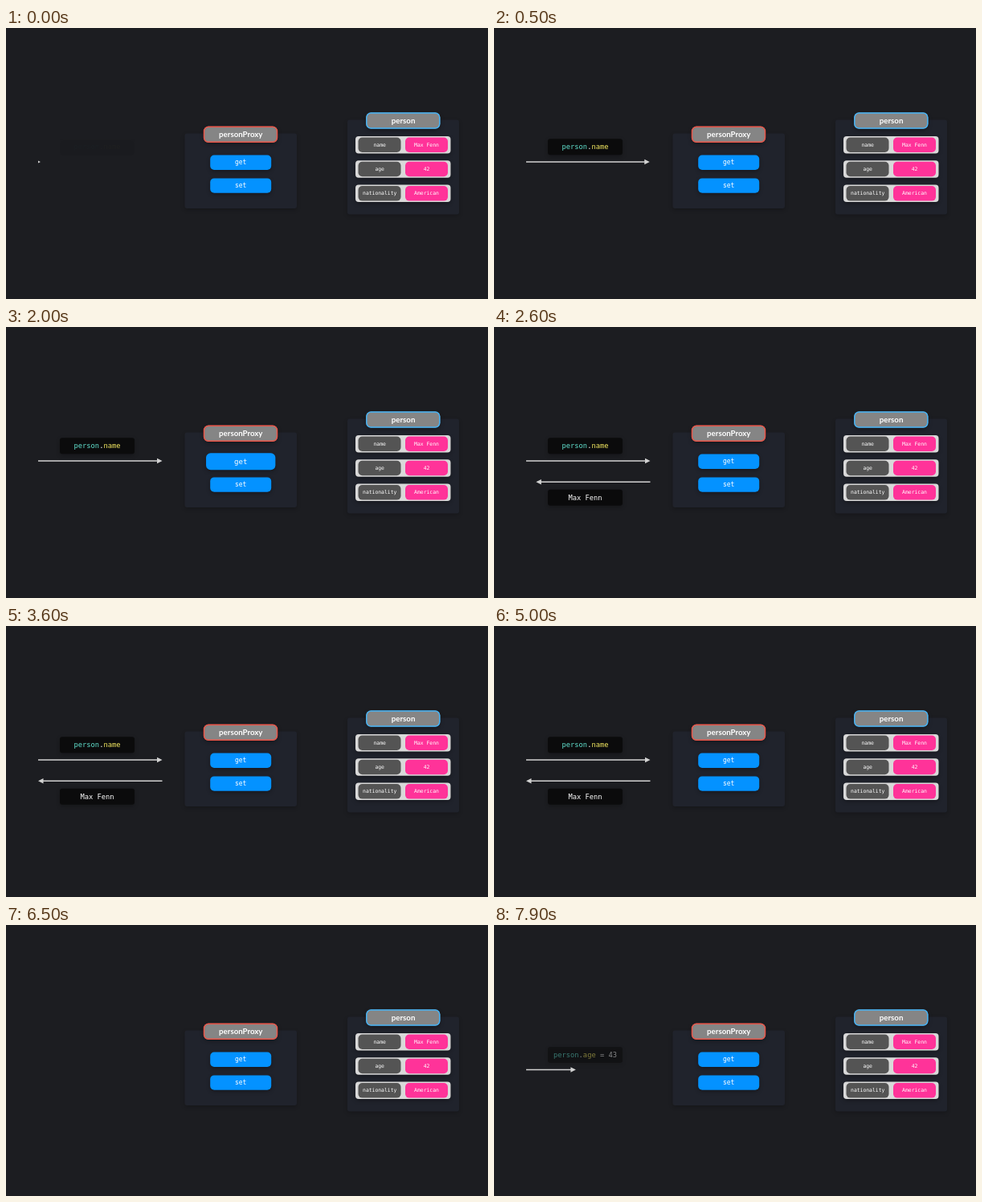
Write an HTML page with a canvas that moves like this. It is 600x338 px and loops after 8000 ms.

```html
<!DOCTYPE html>
<html lang="en">
<head>
<meta charset="utf-8">
<title>Proxy get and set</title>
<style>
html, body { margin: 0; width: 100%; height: 100%; overflow: hidden; background: #1c1d21; }
canvas { display: block; width: 600px; height: 338px; }
</style>
</head>
<body>
<canvas id="stage"></canvas>
<script>
const W = 600, H = 338, LOOP = 8000;
const MONO = '"DejaVu Sans Mono", monospace';
const SANS = 'Lato, sans-serif';
const CYAN = '#62e3d0', YELLOW = '#f5ea62', WHITE = '#ffffff';
const OWNER = 'Max Fenn';

const canvas = document.getElementById('stage');
const ctx = canvas.getContext('2d');
const dpr = window.devicePixelRatio || 1;
canvas.width = W * dpr;
canvas.height = H * dpr;

// Smooth 0..1 progress of a step that starts at `start` and lasts `dur`.
function ease(t, start, dur) {
  const x = Math.min(1, Math.max(0, (t - start) / dur));
  return x * x * (3 - 2 * x);
}

function shadow(alpha, blur, dy) {
  ctx.shadowColor = `rgba(0,0,0,${alpha})`;
  ctx.shadowBlur = blur * dpr;
  ctx.shadowOffsetY = dy * dpr;
}

function box(x, y, w, h, r, fill, shade = 0) {
  ctx.save();
  if (shade) shadow(shade, 5, 2);
  ctx.fillStyle = fill;
  ctx.beginPath();
  ctx.roundRect(x, y, w, h, r);
  ctx.fill();
  ctx.restore();
}

function text(str, x, y, font, fill = WHITE, align = 'center') {
  ctx.font = font;
  ctx.fillStyle = fill;
  ctx.textAlign = align;
  ctx.textBaseline = 'alphabetic';
  ctx.fillText(str, x, y);
}

function title(str, x, y, border) {
  box(x, y, 92, 20, 6, '#858585', 0.35);
  ctx.strokeStyle = border;
  ctx.lineWidth = 1.5;
  ctx.beginPath();
  ctx.roundRect(x + 0.5, y + 0.5, 91, 19, 5.5);
  ctx.stroke();
  text(str, x + 46.3, y + 13, `700 9.7px ${SANS}`);
}

function button(str, cx, cy, scale) {
  ctx.save();
  ctx.translate(cx, cy);
  ctx.scale(scale, scale);
  box(-38, -9.2, 76, 18.4, 5, '#0492ff', 0.3);
  text(str, 0, 2.6, `8px ${MONO}`);
  ctx.restore();
}

function row(key, value, y) {
  const font = `6.4px ${MONO}`;
  box(435, y, 118.5, 21.5, 4, '#d9d9d9', 0.3);
  box(438.5, y + 1.5, 53, 18.5, 5, '#545454');
  box(497, y + 1.5, 53, 18.5, 5, '#ff3399');
  text(key, 465.2, y + 12.8, font);
  text(value, 523.5, y + 12.8, font);
}

function label(parts, y, alpha) {
  if (alpha <= 0) return;
  ctx.save();
  ctx.globalAlpha = alpha;
  box(67, y, 93, 20, 3, '#0b0b0c', 0.25);
  ctx.font = `8.75px ${MONO}`;
  const width = parts.reduce((sum, [s]) => sum + ctx.measureText(s).width, 0);
  let x = 113.5 - width / 2;
  for (const [s, color] of parts) {
    text(s, x, y + 13.1, ctx.font, color, 'left');
    x += ctx.measureText(s).width;
  }
  ctx.restore();
}

function arrow(from, to, y, progress, alpha = 1) {
  if (progress <= 0 || alpha <= 0) return;
  const dir = Math.sign(to - from);
  const len = Math.abs(to - from) * progress;
  const tip = from + dir * len;
  const head = Math.min(6.5, Math.max(len, 2));
  const half = head * 0.5;
  ctx.save();
  ctx.globalAlpha = alpha;
  ctx.fillStyle = '#d2d2d2';
  ctx.beginPath();
  ctx.rect(Math.min(from, tip - dir * head), y - 0.8, Math.max(0, len - head), 1.6);
  ctx.moveTo(tip, y);
  ctx.lineTo(tip - dir * head, y - half);
  ctx.lineTo(tip - dir * head, y + half);
  ctx.closePath();
  ctx.fill();
  ctx.restore();
}

function draw(t) {
  ctx.setTransform(dpr, 0, 0, dpr, 0, 0);
  ctx.fillStyle = '#1c1d21';
  ctx.fillRect(0, 0, W, H);

  box(222.5, 131.5, 139.5, 93.5, 3, '#20232c', 0.22);
  box(425, 114.5, 139, 118, 3, '#20232c', 0.22);
  title('personProxy', 246, 122.8, '#ea5548');
  title('person', 448.3, 105.6, '#45b3f5');

  const swell = ease(t, 520, 400) - ease(t, 1850, 400);
  button('get', 292.2, 167.8, 1 + 0.2 * swell);
  button('set', 292.2, 196.6, 1);

  row('name', OWNER, 135);
  row('age', '42', 165.3);
  row('nationality', 'American', 195.6);

  // Read: request out, value back, then both fade.
  const visible = 1 - ease(t, 5700, 700);
  arrow(40, 194.5, 167, ease(t, -46, 570), visible);
  label([['person', CYAN], ['.', WHITE], ['name', YELLOW]], 138.3, ease(t, -46, 500) * visible);
  arrow(194.5, 40, 193.2, ease(t, 2130, 570), visible);
  label([[OWNER, WHITE]], 202.8, ease(t, 2130, 500) * visible);

  // Write: the next request starts.
  arrow(40, 194.5, 180.5, ease(t, 7654, 570));
  label([['person', CYAN], ['.', WHITE], ['age', YELLOW], [' = 43', WHITE]], 152, ease(t, 7654, 500));
}

const begin = performance.now();
function tick() {
  draw((performance.now() - begin) % LOOP);
  requestAnimationFrame(tick);
}
tick();
</script>
</body>
</html>
```
